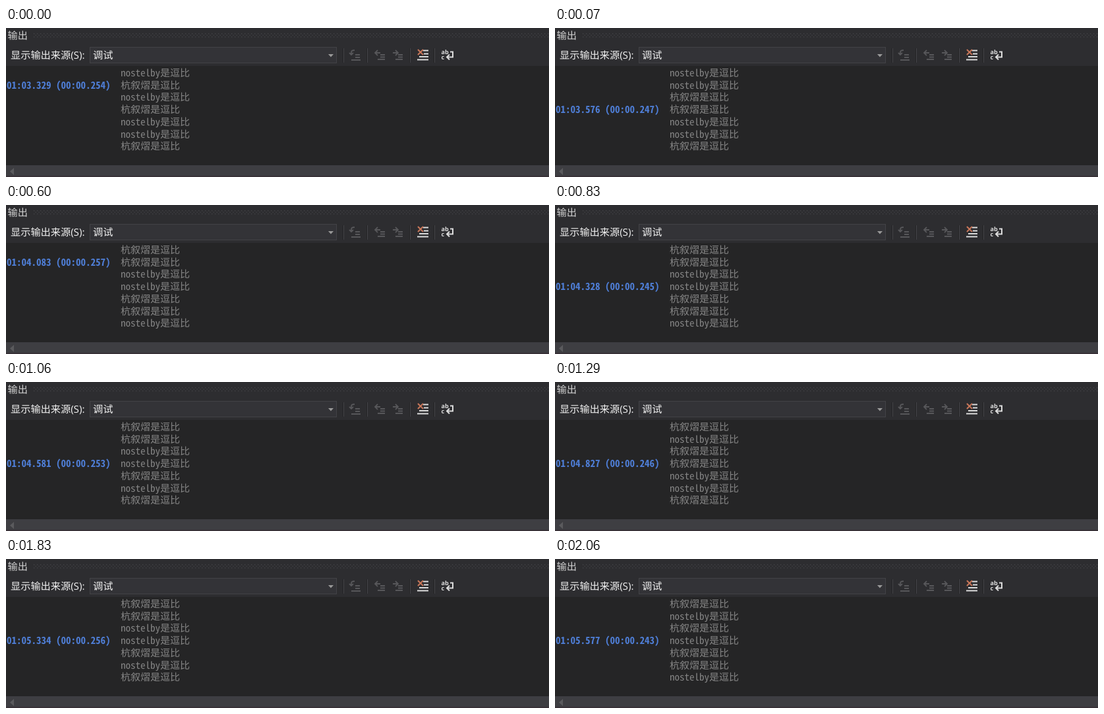
Animation, 824 px wide and 228 px high, one loop 2290 ms. Source, as an HTML page:

```html
<!DOCTYPE html>
<html lang="zh-CN">
<head>
<meta charset="utf-8">
<title>输出</title>
<style>
  html, body { margin: 0; width: 100%; height: 100%; overflow: hidden; background: #252526; }
  svg { display: block; width: 824px; height: 228px; }
  text { text-rendering: geometricPrecision; white-space: pre; }
  .ui { font: 500 15.2px "Noto Sans CJK SC", "Noto Sans CJK", sans-serif; fill: #f1f1f1; }
  .ui .latin { font-family: "Open Sans", sans-serif; font-weight: 400; }
  .log { font: 15px "Noto Sans Mono CJK SC", "Noto Sans CJK SC", monospace; fill: #858585; }
  .log .han { font-weight: 300; }
  #stamp { font-weight: 700; fill: #4f7fd8; }
  .dim { stroke: #57575a; }
  .lit { stroke: #dcdcdc; }
  .icon { fill: none; stroke-width: 1.8; }
</style>
</head>
<body>
<svg viewBox="0 0 824 228">
  <defs>
    <pattern id="grip" x="42" y="8" width="5" height="5" patternUnits="userSpaceOnUse">
      <path d="M0 0h1.2v1.2h-1.2zM2.5 2.5h1.2v1.2h-1.2z" fill="#454549"/>
    </pattern>
    <g id="bar">
      <path d="M.5 0v22" stroke="#222224"/>
      <path d="M1.5 0v22" stroke="#46464a"/>
    </g>
    <path id="lines" d="M9 8h7M9 11.500h7M5 15h11"/>
  </defs>

  <rect width="824" height="58" fill="#2d2d30"/>
  <rect y="58" width="824" height="152" fill="#252526"/>
  <rect y="210" width="824" height="16" fill="#3e3e42"/>
  <rect y="226" width="824" height="2" fill="#383238"/>
  <path d="M12 214v11l-6-5.500z" fill="#5a5a5d"/>

  <text class="ui" x="2.500" y="17" style="fill:#d0d0d0">输出</text>
  <rect x="42" y="8" width="782" height="7" fill="url(#grip)"/>

  <text class="ui" x="7" y="47">显示输出来源<tspan class="latin">(S):</tspan></text>
  <rect x="127.500" y="29.500" width="374" height="24" fill="#333337" stroke="#434346"/>
  <text class="ui" x="132" y="47">调试</text>
  <path d="M489 40h8l-4 4.500z" fill="#999"/>

  <use href="#bar" x="511" y="31"/>
  <use href="#bar" x="547" y="31"/>
  <use href="#bar" x="612" y="31"/>
  <use href="#bar" x="649" y="31"/>

  <g class="icon dim">
    <path d="M524 41v-4q0-3 5-3M521 38l3 3 3-3M530 41h7M530 45h7M524 49h14"/>
    <use href="#lines" x="559" y="33"/>
    <path d="M560 38h8M564 34l-4 4 4 4"/>
    <use href="#lines" x="586" y="33"/>
    <path d="M587 38h8M591 34l4 4-4 4"/>
  </g>
  <g class="icon lit">
    <path d="M633 34.500h8M634 39.500h7M627 44h14M624 48.500h17" stroke-width="2"/>
    <path d="M625 33l8 8M633 33l-8 8" stroke="#c9775a" stroke-width="2"/>
    <path d="M674 36.500h4v8h-9M673 40.500l-4 4 4 4" stroke-width="2"/>
  </g>
  <g font-family="'Open Sans', sans-serif" font-size="9" font-weight="700" fill="#dcdcdc">
    <text x="660.500" y="40">ab</text>
    <text x="660.500" y="48">c</text>
  </g>

  <g id="rows"></g>
  <text id="stamp" class="log" x="1"></text>
</svg>
<script>
  const LOOP = 2290;
  const names = {
    W: 'nostelby<tspan class="han">是逗比</tspan>',
    L: '<tspan class="han">杭叙熠是逗比</tspan>'
  };
  // start in ms, log lines, stamped row, stamp
  const states = [
    [0,    'WLWLWWL', 1, '01:03.329 (00:00.254)'],
    [70,   'WWLLWWL', 3, '01:03.576 (00:00.247)'],
    [370,  'WWLLWWL', 3, '01:03.826 (00:00.250)'],
    [600,  'LLWWLLW', 1, '01:04.083 (00:00.257)'],
    [830,  'LLWWLLW', 3, '01:04.328 (00:00.245)'],
    [1060, 'LLWWLWL', 3, '01:04.581 (00:00.253)'],
    [1290, 'LWLLWWL', 3, '01:04.827 (00:00.246)'],
    [1600, 'LLWWLLW', 1, '01:05.078 (00:00.250)'],
    [1830, 'LLWWLWL', 3, '01:05.334 (00:00.256)'],
    [2060, 'LWLWLLW', 3, '01:05.577 (00:00.243)']
  ];
  const rows = document.getElementById('rows');
  const stamp = document.getElementById('stamp');
  const baseline = row => Math.round(74 + 18.7 * row);
  let shown;

  function show(state) {
    const [, lines, row, time] = state;
    rows.innerHTML = [...lines].map((who, i) =>
      `<text class="log" x="174" y="${baseline(i)}">${names[who]}</text>`).join('');
    stamp.setAttribute('y', baseline(row));
    stamp.textContent = time;
    shown = state;
  }

  function tick() {
    const t = performance.now() % LOOP;
    const state = states.findLast(s => s[0] <= t);
    if (state !== shown) show(state);
    requestAnimationFrame(tick);
  }
  tick();
</script>
</body>
</html>
```
